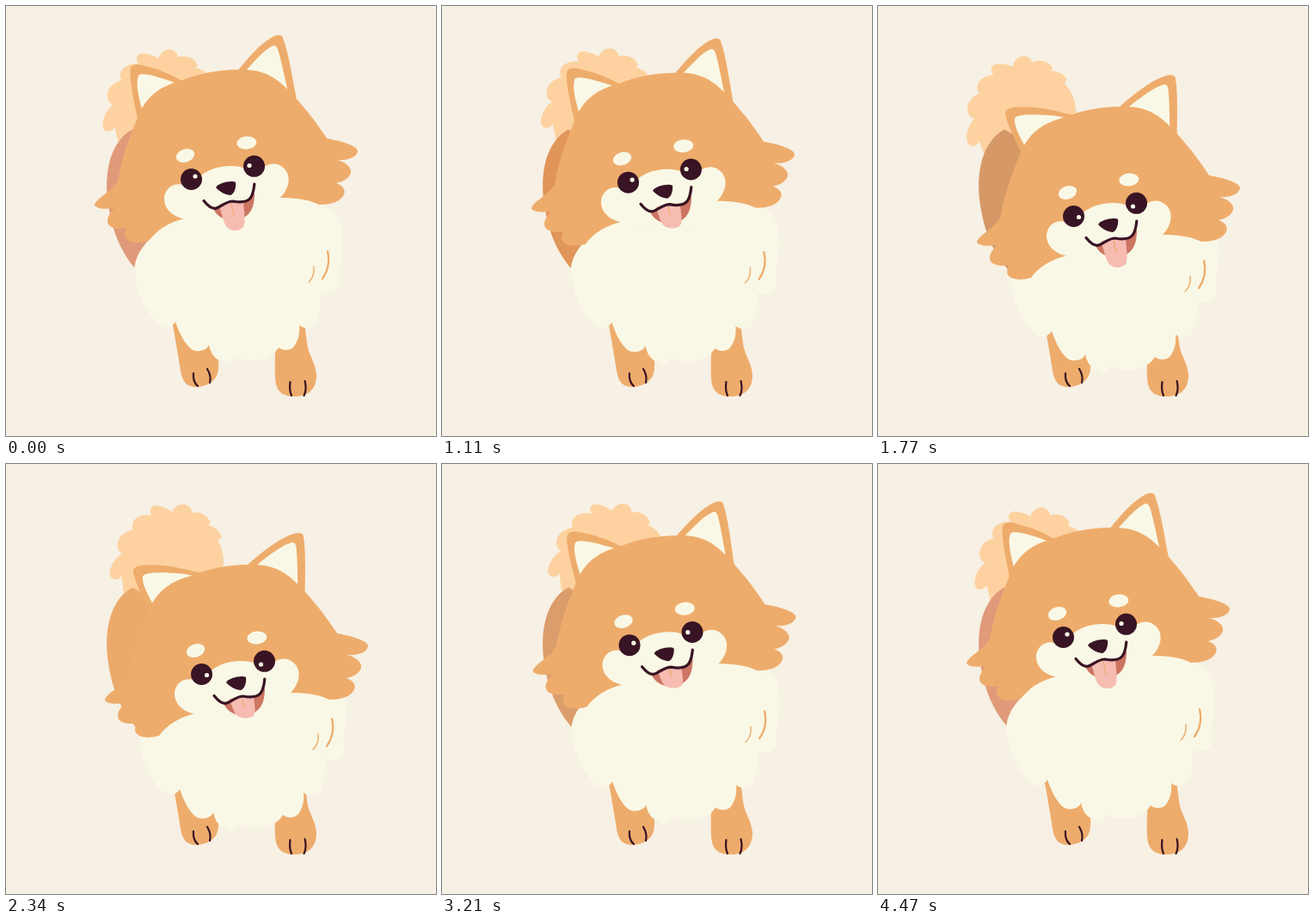
Animation, 500 px wide and 500 px high, one loop 4.53 s. Source, as an HTML page:

```html
<!DOCTYPE html>
<html lang="en">
<head>
<meta charset="utf-8">
<title>Happy dog</title>
<style>
  html, body { margin: 0; width: 100%; height: 100%; overflow: hidden; background: #f7f0e4; }
  svg { display: block; width: 100vw; height: 100vh; }
  .fur { fill: #eeac6c; }
  .white { fill: #f9f8e6; }
  .dark { fill: #381424; }
  .line { fill: none; stroke: #381424; stroke-width: 2.2; stroke-linecap: round; }
  .crease { stroke: #eeac6c; }
</style>
</head>
<body>
<svg viewBox="0 0 500 500">
  <path id="tail" fill="#fdd2a0" d="M150 172L130 162L125 143C121 151 111 149 111 141C111 131 117 121 123 117C115 115 114 102 119 97C122 92 128 90 132 88C128 82 131 74 139 71C143 69 147 69 151 69C146 60 151 56 159 57C166 58 171 60 174 62C177 54 184 50 190 52C195 54 197 57 197 60C207 57 217 61 220 69C220 70 219 71 217 72C226 73 233 79 235 84C233 87 232 88 231 88C237 96 241 106 241 118L240 165L200 190Z"/>
  <path id="body" d="M147 143.500C122 157 113 192 119 232C125 270 138 294 160 316L250 300L210 190C190 165 163 153 147 143.500Z"/>

  <g id="legs">
    <path class="fur" d="M190 350C195 375 200 405 203 424C205 437 210 443 222 443C238 442 247 433 247 420C248 411 246 403 237 393L240 350Z"/>
    <path class="fur" d="M314 370C314 395 312 415 313 433C314 449 322 454 336 454C352 454 361 445 361 429C360 414 352 407 350 392L346 360Z"/>
    <path class="line" d="M218 427Q217 437 223 442M234 422Q239 430 237 438M330.500 437Q329 446 332 453M347.500 436Q350 446 346.500 453"/>
  </g>

  <g id="chest">
    <path class="white" d="M168 270C154 284 147 299 150 314C154 338 164 358 178 371C184 376 193 374 197 367C202 382 209 395 217 400C225 403 234 400 236 394C238 404 244 413 251 412C253 417 260 419 266 407C273 412 283 413 292 412C304 411 313 404 317 397C321 401 330 401 334 397C340 390 342 380 341 371C348 377 361 376 364 360C366 350 366 341 366 332C374 336 386 334 388 324C389 314 387 309 388 303C393 288 393 264 388 250C383 238 373 233 362 228L300 200L220 220Z"/>
    <path class="line crease" d="M374 285Q378 303 368 317"/>
    <path class="line crease" style="stroke-width:1.4" d="M358 303Q359 315 352 321"/>
  </g>

  <g id="head">
    <g id="earL">
      <path class="fur" d="M153 131C148 108 143 82 145 72C147 67 155 67 163 70C180 74 195 81 210 90L235 102L180 130Z"/>
      <path class="white" d="M158 120C153 101 151 88 154 81C157 77 172 80 201 91L225 103L178 118Z"/>
    </g>
    <g id="earR">
      <path class="fur" d="M255 95L268 77C284 57 298 42 310 36C316 33 321 33 322 37C329 56 333 84 338 109L300 110Z"/>
      <path class="white" d="M262 95L275 80C290 62 302 50 309 47C314 44 316 49 318 57C322 72 325 88 328 100L300 105Z"/>
    </g>
    <path class="fur" d="M151 135C160 108 176 94 203 87C224 79 245 74 270 74C300 73 315 82 337 107C352 124 362 137 373 154C390 157 407 162 409 168C409 176 396 180 385 179C396 182 402 188 401 194C398 202 391 204 384 206C392 209 395 214 393 219C389 228 377 231 364 231C350 224 334 223 318 223L270 240L208 247C189 252 175 260 166 273C152 277 140 275 138 267C138 263 139 261 140 258C128 261 118 257 118 250C118 244 122 240 126 235C113 237 103 235 103 231C106 223 121 217 130 204C134 180 142 156 151 135Z"/>
    <path class="white" d="M208 248C191 244 183 234 184 222C187 207 202 203 215 212C224 195 240 186 262 186C275 186 283 191 290 196C300 184 312 180 321 187C332 195 331 211 318 224L300 258L215 258Z"/>
    <ellipse class="white" cx="208.500" cy="174" rx="11" ry="7.500" transform="rotate(-18 208.500 174)"/>
    <ellipse class="white" cx="279.800" cy="159" rx="11.500" ry="7.500" transform="rotate(-5 279.800 159)"/>
    <circle class="dark" cx="215.500" cy="201.500" r="12.500"/>
    <circle class="dark" cx="288.500" cy="186.300" r="12.500"/>
    <g id="glints" class="white">
      <circle cx="220" cy="198" r="2.600"/>
      <circle cx="283" cy="185.500" r="2.600"/>
    </g>
    <path class="dark" d="M244 211C246 206 262 202 267 205C268 211 265 219 261 220C256 220 248 216 244 211Z"/>
    <path fill="#cc7562" d="M241 236C250 233 256 229 263 227C275 229 283 226 289 217C289 235 284 243 273 248C258 252 247 247 241 236Z"/>
    <g id="tongue">
      <path fill="#f6bcb2" d="M247 231C251 240 252 250 256 256C261 263 272 262 276 257C279 251 277 240 276 228C268 230 258 226 247 231Z"/>
      <path class="line crease" style="stroke-width:1.200" d="M262 229Q263 238 265 244"/>
    </g>
    <path class="line" style="stroke-width:3.200" d="M230 226.500C236 234 241 237 246 234.500C253 231 257 227 264 227C274 229 280 228 284 223.500C288 218 288 213 288.800 207"/>
  </g>
</svg>
<script>
const LOOP = 4530, STEP = 30, LAST = 4470;
const $ = id => document.getElementById(id);
const [tail, body, chest, head, earL, earR, glints, tongue] =
  ['tail', 'body', 'chest', 'head', 'earL', 'earR', 'glints', 'tongue'].map($);

const ease = x => x * x * (3 - 2 * x);
const ramp = (t, from, to) => ease(Math.min(1, Math.max(0, (t - from) / (to - from))));
const mix = (a, b, k) => a + (b - a) * k;
const set = (el, value) => el.setAttribute('transform', value);

// Finds the pair of keys around t and the share between them
function between(times, t) {
  let i = 0;
  while (i < times.length - 2 && t >= times[i + 1]) i++;
  return [i, (t - times[i]) / (times[i + 1] - times[i])];
}

// Swing 0..1 with its own value at both ends of the loop
const beats = [0, 375, 840, 1305, 1770, 2235, 2700, 3165, 3630, 4095, LAST];
function swing(t, rest) {
  const value = i => i === 0 || i === beats.length - 1 ? rest : i % 2;
  const [i, k] = between(beats, t);
  return mix(value(i), value(i + 1), ease(k));
}

const shadeTimes = [0, 1110, 1770, 2340, 2910, 3630, LAST];
const shades = [
  [224, 154, 122], [224, 149, 90], [213, 152, 102], [235, 170, 107],
  [220, 158, 104], [218, 155, 114], [224, 154, 122]
];

function draw(t) {
  const down = ramp(t, 997, 1625) - ramp(t, 2769, 3397);
  set(head, `translate(${12 * down} ${43 * down})`);
  set(chest, `translate(${5 * down} ${11 * down})`);
  set(earL, `rotate(${-15.5 * down} 175 110)`);
  set(earR, `rotate(${11.2 * down} 305 100)`);
  set(glints, `translate(${1.5 * down} ${4.5 * down})`);

  set(tail, `rotate(${16 * (swing(t, 0.5) - 0.43)} 235 212)`);
  const pant = 1 - 0.3 * swing(t, 0);
  set(tongue, `translate(0 228) scale(1 ${pant}) translate(0 -228)`);

  const [i, k] = between(shadeTimes, t);
  const rgb = shades[i].map((c, n) => Math.round(mix(c, shades[i + 1][n], k)));
  body.setAttribute('fill', `rgb(${rgb})`);
}

const start = performance.now();
function tick() {
  const t = (performance.now() - start) % LOOP;
  draw(Math.min(LAST, Math.floor(t / STEP) * STEP));
  requestAnimationFrame(tick);
}
tick();
</script>
</body>
</html>
```
